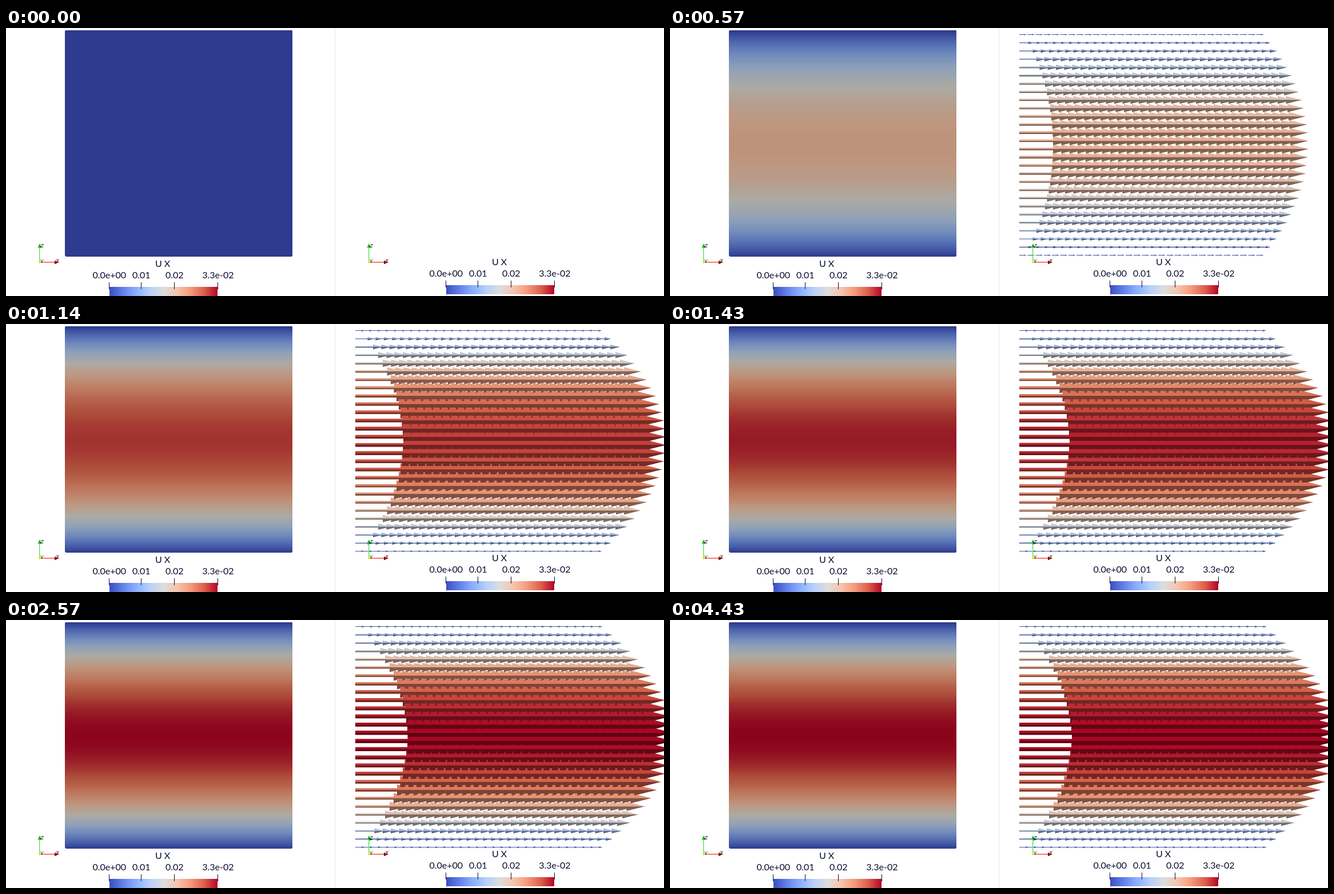
Write an HTML page with a canvas that moves like this. It is 1151 px wide and 470 px high and loops after 4.57 s.

```html
<!DOCTYPE html>
<html lang="en">
<head>
<meta charset="utf-8">
<title>Channel flow start-up</title>
<style>
html, body { margin: 0; width: 100%; height: 100%; overflow: hidden; background: #fff; }
canvas { display: block; }
</style>
</head>
<body>
<canvas id="stage" width="1151" height="470"></canvas>
<script>
const ctx = document.getElementById('stage').getContext('2d');
const LOOP = 4570, TICK = LOOP / 32, DECAY = 0.355;
const INK = '#0b0b33';

const STOPS = [
  [59, 76, 192], [98, 130, 234], [141, 176, 254], [184, 208, 249], [221, 221, 221],
  [245, 196, 173], [244, 154, 123], [222, 96, 77], [180, 4, 38]
];
const FLAT = [0.775, 0.77, 0.74], LIT = [0.94, 0.92, 0.9], SHADE = [0.53, 0.51, 0.5];

function tone(u, light) {
  const p = Math.min(Math.max(u, 0), 1) * 8, i = Math.min(7, Math.floor(p)), f = p - i;
  return STOPS[i].map((c, n) => Math.round((c + (STOPS[i + 1][n] - c) * f) * light[n]));
}
const css = c => `rgb(${c})`;
const pack = ([r, g, b]) => (255 << 24 | b << 16 | g << 8 | r) >>> 0;

// Start-up of plane channel flow, eta = -1..1 across the channel.
function speed(eta, step) {
  if (!step || Math.abs(eta) >= 1) return 0;
  let u = 1 - eta * eta;
  for (let n = 0; n < 5; n++) {
    const m = 2 * n + 1;
    u -= (n % 2 ? -1 : 1) * 32 / (Math.PI * m) ** 3 *
      Math.cos(m * Math.PI * eta / 2) * Math.exp(-m * m * DECAY * step);
  }
  return Math.max(0, u);
}

function drawField(step) {
  ctx.save();
  ctx.beginPath();
  [[103, 5], [105, 4], [500, 4], [501, 5], [501, 400], [499, 401], [105, 401], [103, 399]]
    .forEach(p => ctx.lineTo(...p));
  ctx.clip();
  for (let y = 4; y < 401; y++) {
    ctx.fillStyle = css(tone(speed((y + 0.5 - 203) / 198, step), FLAT));
    ctx.fillRect(103, y, 398, 1);
  }
  ctx.restore();
}

// Six-sided arrows, depth-tested against each other.
const S = 2, LEFT = 610, W = 541 * S, H = 412 * S;
const ROWS = 28, COLS = 30, PITCH = 14.3, LONGEST = 141.5;
const layer = document.createElement('canvas');
layer.width = W;
layer.height = H;
const lctx = layer.getContext('2d');
const image = lctx.createImageData(W, H);
const pixels = new Uint32Array(image.data.buffer);
const depth = new Float32Array(W * H);

function radius(x, len) {
  const first = Math.max(0, Math.ceil((x - len) / PITCH));
  const last = Math.min(COLS - 1, Math.floor(x / PITCH));
  let r = 0;
  for (let i = first; i <= last; i++) {
    const d = x - i * PITCH;
    r = Math.max(r, d < 0.65 * len ? 0.03 * len : 0.1 * (len - d) / 0.35);
  }
  return r;
}

function renderArrows(step) {
  pixels.fill(0);
  depth.fill(0);
  for (let row = 0; row < ROWS; row++) {
    const yc = 205 + (row - (ROWS - 1) / 2) * 14.33;
    const u = speed((yc - 205) / 207, step), len = LONGEST * u;
    if (len < 0.5) continue;
    const lit = pack(tone(u, LIT)), shade = pack(tone(u, SHADE));
    for (let px = 0; px < W; px++) {
      const r = radius(LEFT + (px + 0.5) / S - 611, len);
      if (r <= 0) continue;
      const half = 0.866 * r;
      const end = Math.min(H - 1, Math.floor((yc + half) * S - 0.5));
      for (let py = Math.max(0, Math.ceil((yc - half) * S - 0.5)); py <= end; py++) {
        const dy = (py + 0.5) / S - yc, z = r - Math.abs(dy) * 0.577, k = py * W + px;
        if (z > depth[k]) {
          depth[k] = z;
          pixels[k] = dy < 0 ? lit : shade;
        }
      }
    }
  }
  lctx.putImageData(image, 0, 0);
}

function text(s, x, y, font, align = 'center') {
  ctx.font = font;
  ctx.textAlign = align;
  ctx.fillText(s, x, y);
}

function shape(color, points) {
  ctx.fillStyle = color;
  ctx.beginPath();
  points.forEach(p => ctx.lineTo(...p));
  ctx.fill();
}

function drawLegend(dx, dy) {
  ctx.save();
  ctx.translate(dx, dy);
  const bar = ctx.createLinearGradient(181, 0, 370, 0);
  STOPS.forEach((c, i) => bar.addColorStop(i / 8, css(c)));
  ctx.fillStyle = bar;
  ctx.fillRect(181, 454, 189, 16);
  ctx.fillStyle = INK;
  const font = '16px Lato, sans-serif';
  text('U X', 274, 419, font);
  [['0.0e+00', 180], ['0.01', 236], ['0.02', 294], ['3.3e-02', 370]].forEach(([s, x]) => {
    text(s, x + 0.8, 439, font);
    ctx.fillRect(x, 446, 1, 12);
  });
  ctx.restore();
}

function drawAxes(dx) {
  ctx.save();
  ctx.translate(dx, 0);
  ctx.fillStyle = '#4be84b';
  ctx.fillRect(58, 384, 1.4, 27);
  ctx.fillStyle = '#f0463c';
  ctx.fillRect(59, 410, 27, 1.4);
  shape('#00c800', [[59, 378], [62, 385], [55.5, 385]]);
  shape('#087808', [[59, 380], [62, 385], [59, 385]]);
  shape('#d40000', [[92, 411], [85, 407.5], [85, 414]]);
  shape('#700000', [[92, 411], [85, 411], [85, 414]]);
  ctx.fillStyle = '#f0e800';
  ctx.beginPath();
  ctx.arc(59, 410.7, 2, 0, 7);
  ctx.fill();
  ctx.fillStyle = '#111';
  const font = 'italic 9px "Liberation Sans", sans-serif';
  text('Z', 63, 385, font);
  text('Y', 62.5, 412, font);
  text('X', 90, 411, font);
  ctx.restore();
}

function draw(step) {
  ctx.fillStyle = '#fff';
  ctx.fillRect(0, 0, 1151, 470);
  drawField(step);
  renderArrows(step);
  ctx.imageSmoothingQuality = 'high';
  ctx.drawImage(layer, LEFT, 0, W / S, H / S);
  ctx.fillStyle = '#e9e9e9';
  ctx.fillRect(575, 0, 1, 470);
  drawLegend(0, 0);
  drawLegend(589, -3);
  drawAxes(0);
  drawAxes(576);
}

const start = performance.now();
let shown = -1;
function tick() {
  const t = (performance.now() - start) % LOOP;
  const step = Math.max(0, Math.min(31, Math.floor((t + 3) / TICK)) - 1);
  if (step !== shown) draw(shown = step);
  requestAnimationFrame(tick);
}
tick();
</script>
</body>
</html>
```
